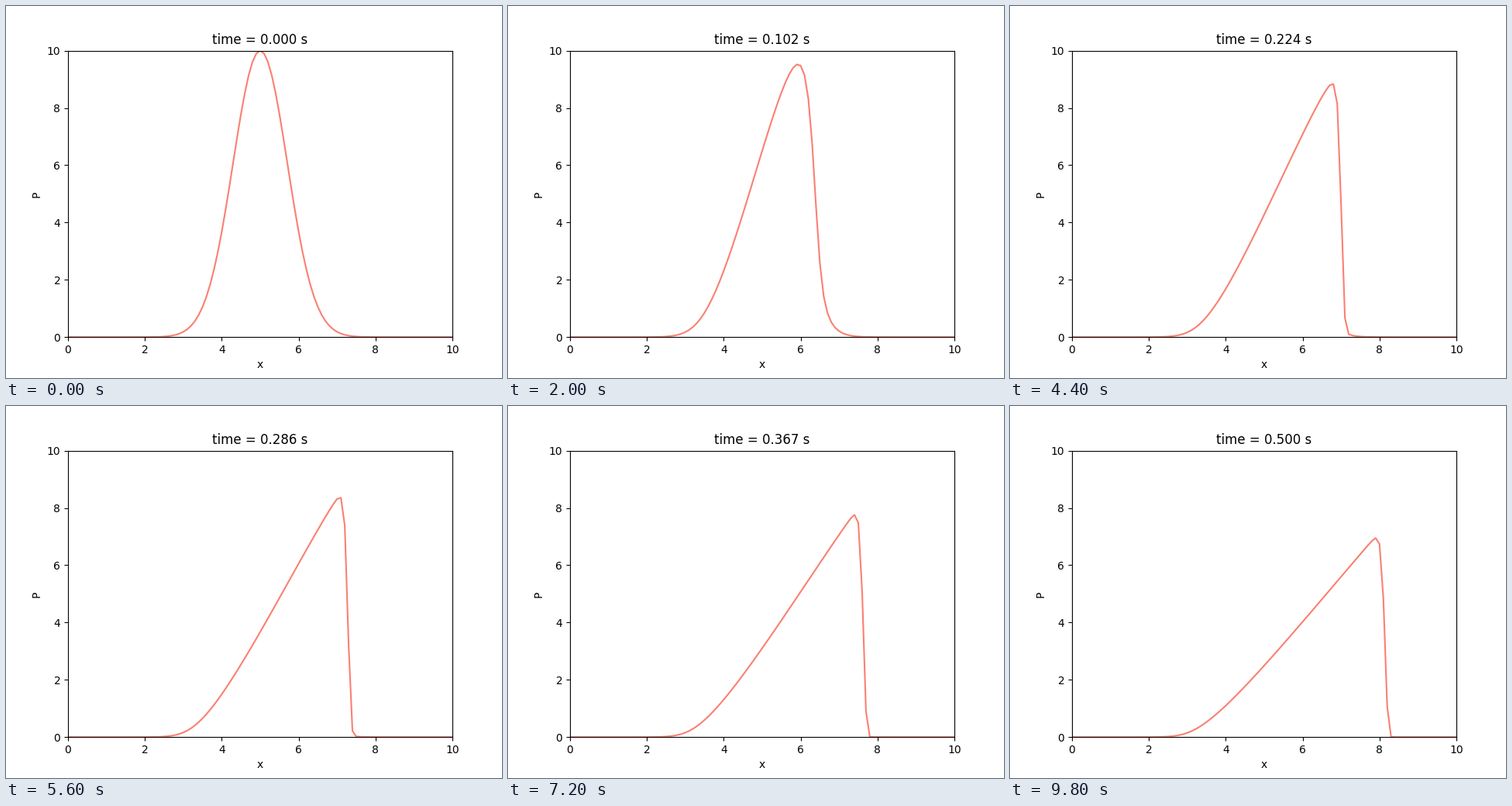
Write a matplotlib script that moves like this. It is 640 px wide and 480 px high and loops after 10000 ms.

```python
import numpy as np
import matplotlib.pyplot as plt
from matplotlib.animation import FuncAnimation

FRAMES = 50
SUBSTEPS = 2
T_END = 0.5

x = np.linspace(0, 10, 101)
dx = x[1] - x[0]
times = np.linspace(0, T_END, FRAMES)
dt = times[1] / SUBSTEPS


def step(u):
    """One conservative upwind step of u_t + (u^2 / 2)_x = 0."""
    flux = 0.5 * u**2
    new = u.copy()
    new[1:] -= dt / dx * np.diff(flux)
    return new


def solve():
    u = 10 * np.exp(-(x - 5) ** 2)
    waves = [u]
    for _ in range(FRAMES - 1):
        for _ in range(SUBSTEPS):
            u = step(u)
        waves.append(u)
    return waves


waves = solve()

fig, ax = plt.subplots(figsize=(6.4, 4.8), dpi=100)
line, = ax.plot(x, waves[0], color="salmon")
ax.set_xlim(0, 10)
ax.set_ylim(0, 10)
ax.set_xlabel("x")
ax.set_ylabel("P")
title = ax.set_title("time = 0.000 s")


def update(i):
    line.set_ydata(waves[i])
    title.set_text(f"time = {times[i]:.3f} s")
    return line, title


anim = FuncAnimation(fig, update, frames=FRAMES, interval=200,
                     repeat=True, repeat_delay=0, blit=False)
plt.show()
```
